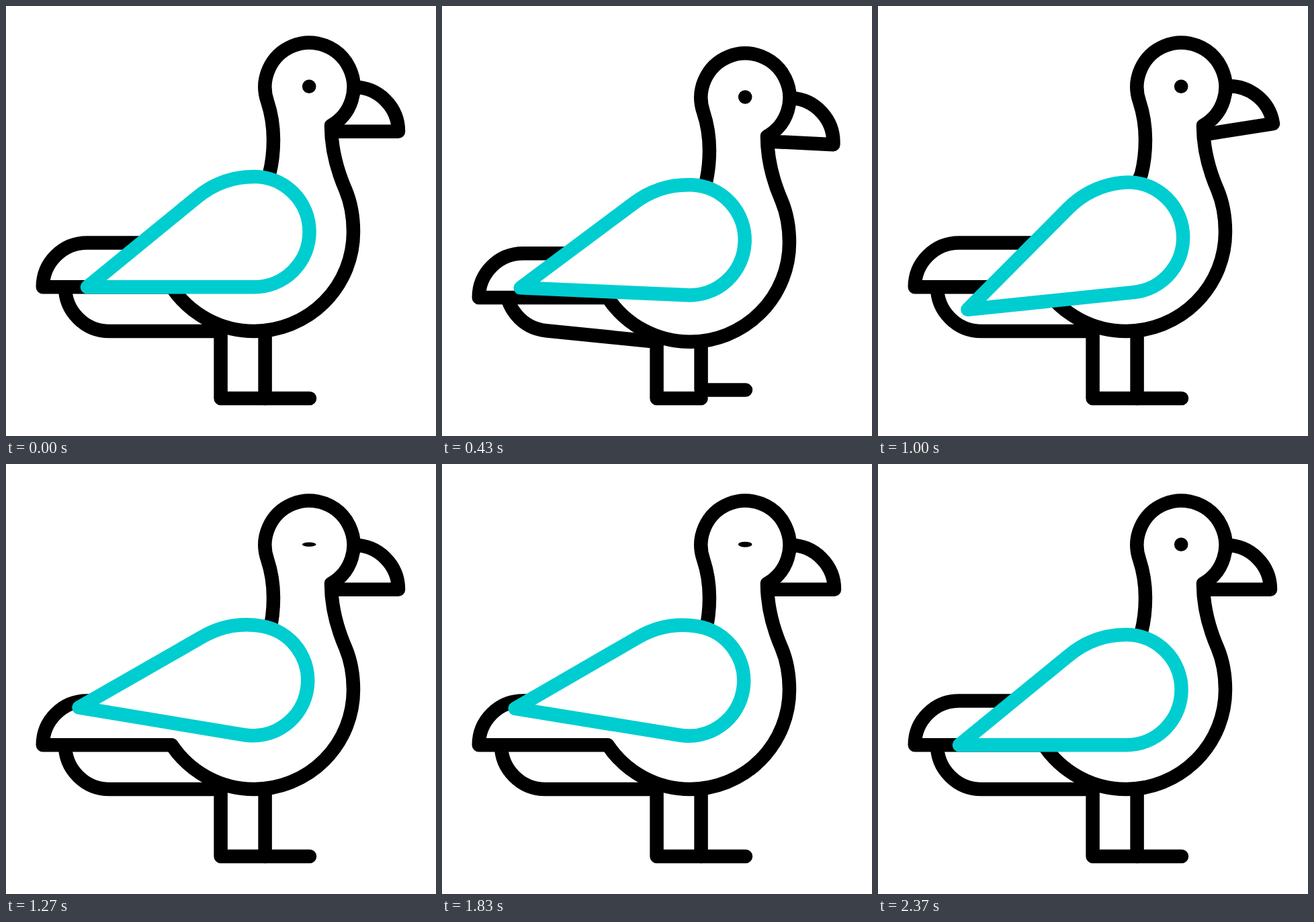
Animation, 640 px wide and 640 px high, one loop 2.57 s. Source, as an HTML page:

```html
<!DOCTYPE html>
<html lang="en">
<head>
<meta charset="utf-8">
<title>Seagull</title>
<style>
  html, body { margin: 0; width: 100%; height: 100%; overflow: hidden; background: #fff; }
  svg { display: block; width: 100vw; height: 100vh; }
</style>
</head>
<body>
<svg viewBox="0 0 640 640" fill="#fff" stroke="#000" stroke-width="20.5" stroke-linecap="round" stroke-linejoin="round">
  <path id="backLeg" fill="none" d="M319.6 440V584H385.6"/>
  <path id="frontLeg" fill="none" d="M385.6 440V584H452"/>
  <g id="bird">
    <path id="under" fill="none" d="M88 418A66 66 0 0 0 154 484H320"/>
    <path id="beak" d="M486 186.8H584A66 66 0 0 0 518 120.8"/>
    <path d="M280 352.4H120.6A65.8 65.8 0 0 0 54.8 418.2H246.6A147.7 147.7 0 0 0 369.3 484A147.7 147.7 0 0 0 517 336.3C517 314 513 292 505.5 274C492 243 484 212 484 178A66 66 0 1 0 389 142C395 160 398 180 398 199C398 217 396 234 392 250L375 290Z"/>
    <ellipse id="eye" cx="451.2" cy="119.7" rx="10.3" ry="10.3" fill="#000" stroke="none"/>
    <path id="wing" stroke="#00cdd0" d="M121 418.2H369.5A82 82 0 0 0 369.5 254C338 254 308 265 284 285Z"/>
  </g>
</svg>
<script>
const LOOP = 2570, STEP = 100 / 3, LAST = 71;
const BEAT = 280, BLINK = 95;
const $ = id => document.getElementById(id);

function ease(t, from, to) {
  const u = Math.min(1, Math.max(0, (t - from) / (to - from)));
  return u * u * (3 - 2 * u);
}

// Rises from 0 to 1 at the peak, then falls back to 0.
const hop = (t, start, peak, end) => ease(t, start, peak) - ease(t, peak, end);
const pulse = (t, peak, half) => hop(t, peak - half, peak, peak + half);

// Crouch, then jump.
const bob = t => 21 * hop(t, 0, 390, 575) - 16 * hop(t, 390, 575, 765);
const tail = t => 6.2 * hop(t, 0, 400, 620) - hop(t, 400, 620, 770);
const nod = t => 9.8 * hop(t, 310, 660, 940) - 10 * pulse(t, 940, BEAT);

function flap(t) {
  let angle = 6.1 * hop(t, 240, 677, 957);
  for (let k = 0; k < 5; k++) {
    angle += (k % 2 ? 10 : -7) * pulse(t, 957 + k * BEAT, BEAT);
  }
  return angle;
}

const blink = t => pulse(t, 957 + BEAT, BLINK) + pulse(t, 957 + 3 * BEAT, BLINK);

const move = (id, y) => $(id).setAttribute("transform", `translate(0 ${y})`);
const turn = (id, deg, x, y) => $(id).setAttribute("transform", `rotate(${deg} ${x} ${y})`);

function draw(ms) {
  const t = Math.min(LAST, Math.floor((ms % LOOP + 5) / STEP)) * STEP;
  move("bird", bob(t));
  move("frontLeg", -33 * hop(t, 335, 570, 790));
  move("backLeg", -29 * hop(t, 430, 640, 860));
  turn("under", tail(t), 320, 484);
  turn("beak", nod(t), 511, 155);
  turn("wing", flap(t), 452, 315);
  $("eye").setAttribute("ry", 10.3 * (1 - 0.9 * blink(t)));
}

let start = null;
function tick(now) {
  if (start === null) start = now;
  draw(Math.max(0, now - start));
  requestAnimationFrame(tick);
}
draw(0);
requestAnimationFrame(tick);
</script>
</body>
</html>
```
